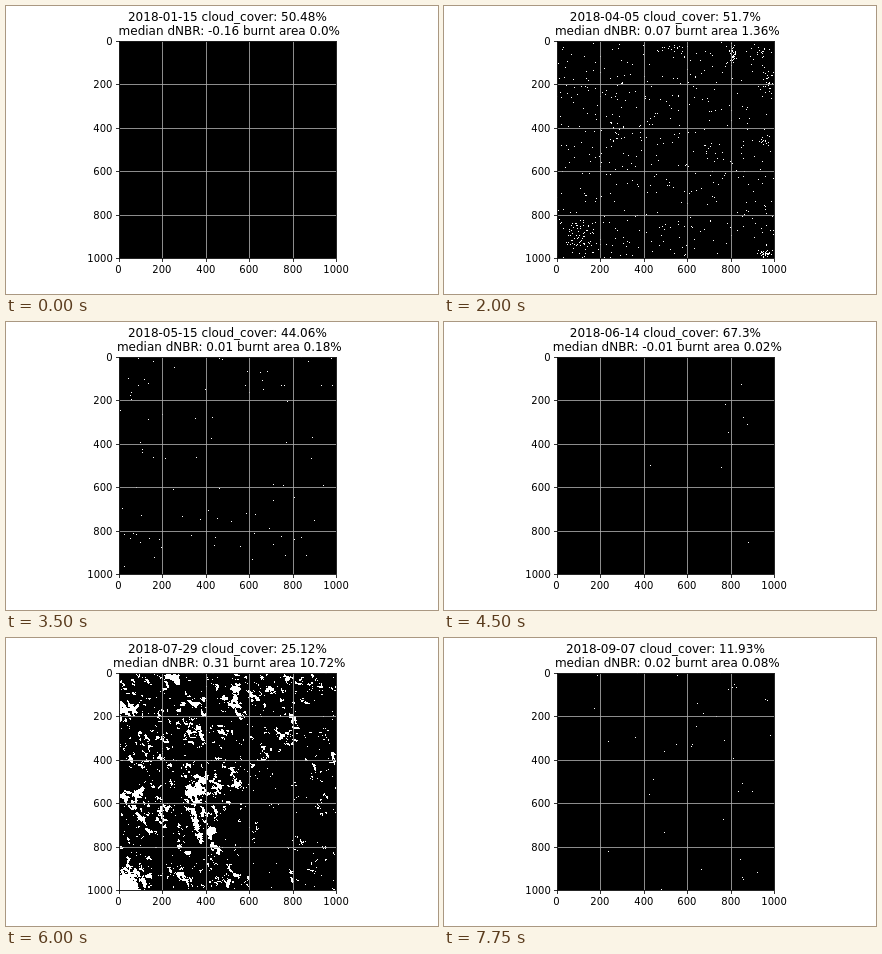
Animation of 432x288 px, one loop 8000 ms. Source, as an HTML page with a canvas:

```html
<!DOCTYPE html>
<html lang="en">
<head>
<meta charset="utf-8">
<title>Burnt area over time</title>
<style>
  html, body { margin: 0; width: 432px; height: 288px; overflow: hidden; background: #fff; }
  canvas { position: absolute; left: 113px; top: 35px; image-rendering: pixelated; }
  svg { position: absolute; left: 0; top: 0; }
  text { font: 10px "DejaVu Sans", sans-serif; fill: #000; white-space: pre; }
  .title { font-size: 12px; text-anchor: middle; }
</style>
</head>
<body>
<canvas id="map" width="217" height="217"></canvas>
<svg width="432" height="288" viewBox="0 0 432 288">
  <g id="grid" stroke="#b0b0b0" stroke-width=".8"></g>
  <g id="ticks" stroke="#000" stroke-width=".8"></g>
  <rect x="113.5" y="35.5" width="217" height="217" fill="none" stroke="#000" stroke-width=".8"/>
  <g id="labels"></g>
  <text class="title" id="line1" x="221.4" y="15"></text>
  <text class="title" id="line2" x="221.4" y="29"></text>
</svg>
<script>
const SIZE = 217, LEFT = 113, TOP = 35, STEP = 250, STEPS = 32;
const $ = id => document.getElementById(id);

// speckle: 1 gives lone pixels, near 0 gives clouds
// patches: x, y, rx, ry, strength of regions that burn more or less
const keys = [
  { step: 0, day: 0, cover: 50.48, dnbr: -.16, burnt: 0, speckle: 1, patches: [] },
  { step: 8, day: 80, cover: 51.7, dnbr: .07, burnt: 1.36, speckle: 1, patches: [
    [230, 44, 12, 4, 2.5], [288, 48, 4, 10, 4], [318, 46, 9, 5, 3], [323, 76, 6, 9, 3.2],
    [321, 132, 4, 5, 3.4], [135, 232, 14, 18, 2.6], [172, 126, 5, 14, 2.6], [321, 248, 7, 4, 4.2]] },
  { step: 14, day: 120, cover: 44.06, dnbr: .01, burnt: .18, speckle: 1, patches: [
    [125, 57, 6, 12, 3], [262, 60, 14, 10, 2.8], [135, 217, 14, 6, 3], [248, 203, 4, 14, 3]] },
  { step: 18, day: 150, cover: 67.3, dnbr: -.01, burnt: .02, speckle: 1, patches: [
    [297, 62, 1, 3, 7], [287, 105, 12, 18, 4]] },
  { step: 24, day: 195, cover: 25.12, dnbr: .31, burnt: 10.72, speckle: .06, patches: [
    [119, 246, 12, 8, 1], [121, 70, 8, 9, .35], [166, 40, 8, 4, .5], [217, 66, 12, 8, .22],
    [190, 152, 14, 8, .28], [130, 158, 14, 14, .22], [192, 190, 12, 25, .2], [290, 190, 40, 50, -.25]] },
  { step: 27, day: 210, cover: 32.38, dnbr: .34, burnt: 33.76, speckle: .06, patches: [
    [255, 90, 55, 40, .15], [310, 130, 22, 60, .18], [240, 190, 40, 20, -.5], [150, 230, 40, 13, -.4],
    [130, 85, 18, 30, -.2], [135, 188, 25, 14, .2], [230, 245, 22, 6, .5]] },
  { step: 31, day: 235, cover: 11.93, dnbr: .02, burnt: .08, speckle: 1, patches: [
    [287, 50, 3, 7, 5], [321, 63, 3, 3, 5], [327, 198, 3, 3, 5], [300, 241, 4, 6, 5]] }
];

const lerp = (a, b, k) => a + (b - a) * k;
const ease = k => k * k * (3 - 2 * k);

function rand(x, y, seed) {
  let h = Math.imul(x, 374761393) + Math.imul(y, 668265263) + Math.imul(seed, 982451653);
  h = Math.imul(h ^ h >>> 13, 1274126177);
  h = Math.imul(h ^ h >>> 15, 2246822519);
  return ((h ^ h >>> 16) >>> 0) / 4294967296;
}

function noise(x, y, seed) {
  const i = Math.floor(x), j = Math.floor(y), u = ease(x - i), v = ease(y - j);
  return lerp(lerp(rand(i, j, seed), rand(i + 1, j, seed), u),
    lerp(rand(i, j + 1, seed), rand(i + 1, j + 1, seed), u), v) - .5;
}

function texture(x, y, seed) {
  const u = x - .25 * y;
  return [[12, .4], [5.5, .7], [2.3, .65]].reduce((sum, [scale, weight]) =>
    sum + weight * noise(u / scale, y / scale, seed + Math.round(scale * 50)), 0);
}

const region = (patches, x, y) => patches.reduce((sum, [cx, cy, rx, ry, s]) =>
  sum + s * Math.exp(-(((x - cx) / rx) ** 2 + ((y - cy) / ry) ** 2) / 2), 0);

// values at a step, between the two keys around it
function stateAt(step) {
  const n = Math.max(1, keys.findIndex(key => key.step >= step));
  const a = keys[n - 1], b = keys[n], k = (step - a.step) / (b.step - a.step);
  const mix = name => lerp(a[name], b[name], k);
  return {
    date: new Date(Date.UTC(2018, 0, 15 + 5 * Math.round(mix("day") / 5))).toISOString().slice(0, 10),
    cover: mix("cover"), dnbr: mix("dnbr"), burnt: mix("burnt"), speckle: mix("speckle"),
    heat: (x, y) => lerp(k < 1 ? region(a.patches, x, y) : 0, k > 0 ? region(b.patches, x, y) : 0, k)
  };
}

// the highest scores turn white until the burnt share is reached
function paint({ burnt, speckle, heat }, seed) {
  const img = new ImageData(SIZE, SIZE), px = new Uint32Array(img.data.buffer);
  const count = Math.round(SIZE * SIZE * burnt / 100);
  const score = new Float32Array(SIZE * SIZE).map((_, k) => {
    const x = LEFT + k % SIZE, y = TOP + Math.floor(k / SIZE);
    return heat(x, y) + (1 - speckle) * texture(x, y, seed) - speckle * Math.log(rand(x, y, seed) + 1e-9);
  });
  const limit = count ? score.slice().sort()[score.length - count] : Infinity;
  score.forEach((s, k) => { px[k] = s >= limit ? 0xffffffff : 0xff000000; });
  return img;
}

// label whose inked width is aligned to whole pixels; align .5 centres, 1 ends at x
function label(value, x, y, align) {
  const ink = 6.36 * String(value).length - 1.3;
  return `<text x="${Math.round(x - ink * align) - .65}" y="${y}">${value}</text>`;
}

function buildAxes() {
  let grid = "", ticks = "", labels = "";
  for (let k = 0; k <= 5; k++) {
    const gap = k * 43.488, x = Math.floor(113.18 + gap) + .5, y = Math.floor(35.06 + gap) + .5;
    grid += `<path d="M${x} 35V252M113 ${y}H330"/>`;
    ticks += `<path d="M${x} 252.5v3.5M113.5 ${y}h-3.5"/>`;
    labels += label(k * 200, 112.68 + gap, 267, .5) + label(k * 200, 105.68, y + 3.5, 1);
  }
  $("grid").innerHTML = grid;
  $("ticks").innerHTML = ticks;
  $("labels").innerHTML = labels;
}

function decimal(value) {
  const short = Number(value.toFixed(2));
  return Number.isInteger(short) ? short.toFixed(1) : String(short);
}

const ctx = $("map").getContext("2d"), cache = [];
let shown = -1;

function draw(time) {
  const step = Math.floor(time / STEP) % STEPS;
  if (step === shown) return;
  shown = step;
  const state = stateAt(step);
  ctx.putImageData(cache[step] ||= paint(state, step), 0, 0);
  $("line1").textContent = `${state.date} cloud_cover: ${decimal(state.cover)}%`;
  $("line2").textContent = `\u00a0median dNBR: ${decimal(state.dnbr)} burnt area ${decimal(state.burnt)}%`;
}

function loop() {
  draw(performance.now() - start);
  requestAnimationFrame(loop);
}

buildAxes();
const start = performance.now();
loop();
</script>
</body>
</html>
```
